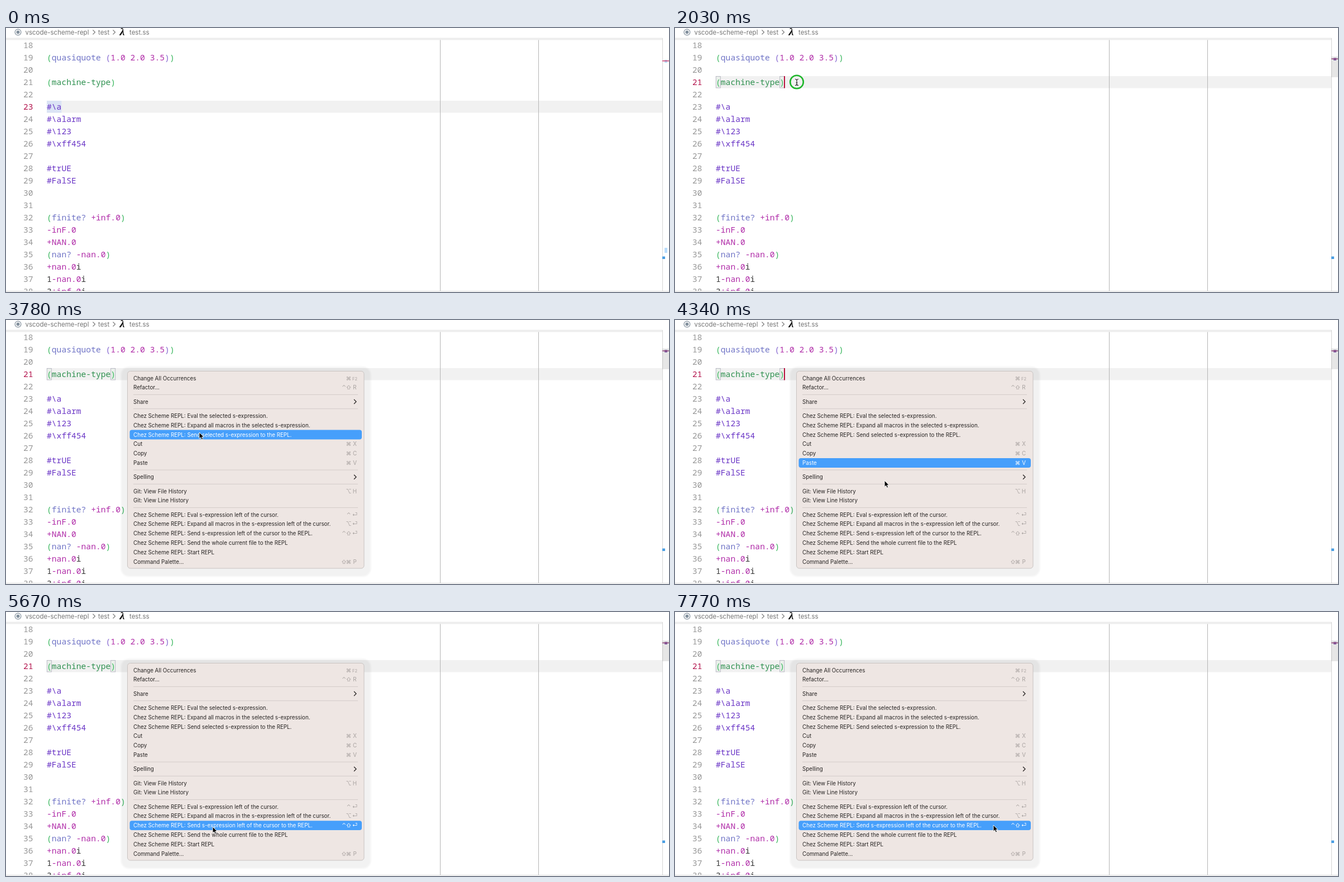
An HTML page that plays this animation: 1187x472 px, repeating every 8000 ms.

```html
<!DOCTYPE html>
<html lang="en">
<head>
<meta charset="utf-8">
<title>Scheme REPL editor</title>
<style>
  html, body { margin: 0; width: 100%; height: 100%; overflow: hidden; background: #fff; }
  svg { display: block; width: 100vw; height: 100vh; }
  text { white-space: pre; }
  .code { font: 14.667px "Noto Sans Mono", "DejaVu Sans Mono", monospace; }
  .num { fill: #979797; text-anchor: end; }
  .num.on { fill: #b3154d; }
  .g { fill: #37b65c; }
  .k { fill: #7074c6; }
  .v { fill: #8667d0; }
  .n { fill: #b02ca8; }
  .m { fill: #2f9150; }
  .c { fill: #6a35c6; }
  .d { fill: #333; }
  .crumb { font: 11.5px Inter, "Open Sans", sans-serif; fill: #767676; }
  .item { font: 9.78px Inter, "DejaVu Sans", sans-serif; fill: #272423; }
  .item .key { fill: #a8a2a0; text-anchor: middle; }
  .item .bar { fill: none; }
  .item.on, .item.on .key { fill: #fff; }
  .item.on .bar { fill: #469ffb; }
  .chevron { fill: none; stroke: #767676; stroke-width: 1.1; }
  .item .chevron { stroke: #272423; stroke-width: 1.3; }
  .halo { filter: blur(1.5px); }
</style>
</head>
<body>
<svg id="stage" viewBox="0 0 1187 472"></svg>
<script>
const STEP = 70, LOOP = 8000;
const CLICK = 980, RIGHT_CLICK = 1960, MENU_OPEN = 2100;
const stage = document.getElementById('stage');

function add(parent, tag, attrs = {}, content) {
  const el = document.createElementNS('http://www.w3.org/2000/svg', tag);
  for (const name in attrs) el.setAttribute(name, attrs[name]);
  if (content !== undefined) el.textContent = content;
  parent.append(el);
  return el;
}
const group = parent => add(parent, 'g');
const rect = (parent, x, y, width, height, fill, more) =>
  add(parent, 'rect', { x, y, width, height, fill, ...more });
const text = (parent, x, y, cls, content, more) =>
  add(parent, 'text', { x, y, class: cls, ...more }, content);
const path = (parent, d, more) => add(parent, 'path', { d, ...more });
const chevron = (parent, x, y) =>
  path(parent, `M${x} ${y - 4}l4 4l-4 4`, { class: 'chevron' });
const show = (el, on) => el.setAttribute('visibility', on ? 'visible' : 'hidden');

// Editor: each token starts with its colour class.
const FIRST_LINE = 18, LEFT = 73, CHAR = 8.8;
const lines = [
  '', 'g(|kquasiquote|v (|n1.0 2.0 3.5|v)|g)', '', 'g(|mmachine-type|g)', '',
  'c#\\a', 'c#\\alarm', 'c#\\123', 'c#\\xff454', '', 'c#trUE', 'c#FalSE', '', '',
  'g(|kfinite? |n+inf.0|g)', 'n-inF.0', 'n+NAN.0', 'g(|knan? |n-nan.0|g)',
  'n+nan.0|di', 'd1|n-nan.0|di', 'd3|n+inf.0|di'
];
const lineTop = n => 20 + 22 * (n - FIRST_LINE);
const column = n => LEFT + CHAR * n;

const band = rect(stage, LEFT, 0, 1102, 21.5, '#f1f1f1');
const selection = rect(stage, LEFT, lineTop(23), 3 * CHAR, 21.5, '#dbe3f5');
const brackets = group(stage);
for (const n of [0, 13])
  rect(brackets, column(n) + .3, 86.5, 8, 20.5, '#ebf0eb', { stroke: '#b4b4c0', 'stroke-width': .9 });

const numbers = {};
lines.forEach((line, i) => {
  const n = FIRST_LINE + i, y = lineTop(n) + 16;
  numbers[n] = text(stage, 48.5, y, 'code num', n);
  const row = text(stage, LEFT, y, 'code');
  for (const token of line.split('|'))
    if (token) add(row, 'tspan', { class: token[0] }, token.slice(1));
});
const caret = rect(stage, 195, 86, 2, 21.5, '#b8123f');

for (const n of [80, 100]) rect(stage, column(n), 18, 1, 453, '#b5b5b5');
rect(stage, 1175, 18, 1, 453, '#d6d6d6');
rect(stage, 0, 470, 1187, 2, '#fff');
rect(stage, 0, 470, 1187, 1, '#d9d9d9');
rect(stage, 0, 17.5, 1175, 4, '#ededed');

// Overview ruler
const rulerBefore = group(stage);
rect(rulerBefore, 1179, 57, 5, 5, '#b5d5f5');
rect(rulerBefore, 1175, 58, 12, 1.5, '#cf4473');
rect(rulerBefore, 1179, 393, 5, 9, '#b9dcfb');
const rulerAfter = group(stage);
rect(rulerAfter, 1179, 53.5, 5, 4.5, '#8b62b0');
rect(rulerAfter, 1175, 54.5, 12, 1.5, '#96407f');
rect(stage, 1175, 408.5, 5, 4.5, '#4a9ee2');
const slider = rect(stage, 1175, 51, 12, 37, 'rgba(100,100,100,.16)');

// Breadcrumbs
add(stage, 'circle', { cx: 21.5, cy: 7.5, r: 5.4, fill: 'none', stroke: '#84919e', 'stroke-width': 1.2 });
add(stage, 'circle', { cx: 21.5, cy: 7.5, r: 3, fill: '#84919e' });
text(stage, 34.5, 12, 'crumb', 'vscode-scheme-repl');
chevron(stage, 155.5, 7.5);
text(stage, 165, 12, 'crumb', 'test');
chevron(stage, 191.5, 7.5);
text(stage, 203, 13, '', 'λ', { style: 'font: italic bold 17px "Noto Serif", serif' });
text(stage, 221, 12, 'crumb', 'test.ss');

// Context menu: label | shortcut glyphs; '-' is a separator, '>' a submenu.
const repl = 'Chez Scheme REPL: ';
const entries = [
  'Change All Occurrences|⌘,F2', 'Refactor...|⌃,⇧,R', '-', 'Share|>', '-',
  repl + 'Eval the selected s-expression.',
  repl + 'Expand all macros in the selected s-expression.',
  repl + 'Send selected s-expression to the REPL.',
  'Cut|⌘,X', 'Copy|⌘,C', 'Paste|⌘,V', '-', 'Spelling|>', '-',
  'Git: View File History|⌥,H', 'Git: View Line History', '-',
  repl + 'Eval s-expression left of the cursor.|⌃,⏎',
  repl + 'Expand all macros in the s-expression left of the cursor.|⌥,⏎',
  repl + 'Send s-expression left of the cursor to the REPL.|⌃,⇧,⏎',
  repl + 'Send the whole current file to the REPL',
  repl + 'Start REPL', 'Command Palette...|⇧,⌘,P'
];
const ROW = 16.83;
const menu = group(stage);
rect(menu, 206, 84, 447, 374.5, 'rgba(0,0,0,.052)', { rx: 14, class: 'halo' });
rect(menu, 217.5, 91.5, 423.5, 352.5, '#eee6e3', { rx: 5, stroke: '#c8c3c1' });

const items = [];
let rowY = 104;
for (const entry of entries) {
  if (entry === '-') {
    rect(menu, 228, rowY - ROW / 2 + 3.7, 402, 1, '#d3ccc9');
    rowY += ROW / 2;
    continue;
  }
  const [label, keys] = entry.split('|');
  const el = add(menu, 'g', { class: 'item' });
  add(el, 'rect', { x: 221.5, y: rowY - ROW / 2, width: 415.5, height: ROW, rx: 4, class: 'bar' });
  text(el, 228, rowY + 3.6, '', label);
  if (keys === '>') chevron(el, 623, rowY);
  else if (keys) keys.split(',').reverse().forEach((key, i) =>
    text(el, [624.5, 613.5, 605][i], rowY + 3.6, 'key', key,
      key === 'F2' ? { 'font-size': 7.5 } : {}));
  items.push({ el, y: rowY });
  rowY += ROW;
}

// Pointer
const ring = add(stage, 'circle', { cx: 218, cy: 96.5, r: 11.8, fill: 'none', stroke: '#1fb62b', 'stroke-width': 2.6 });
const beam = group(stage);
const beamShape = 'M-3 -5.5Q0 -5.5 0 -3.5Q0 -5.5 3 -5.5M0 -4V4M-3 5.5Q0 5.5 0 3.5Q0 5.5 3 5.5M-1.5 1H1.5';
path(beam, beamShape, { fill: 'none', stroke: '#fff', 'stroke-width': 2.6 });
path(beam, beamShape, { fill: 'none', stroke: '#111', 'stroke-width': 1.1 });
const arrow = path(stage, 'M0 0V11.3L2.6 8.9L4.4 13L6.5 12.1L4.7 8.1H8.1Z',
  { fill: '#000', stroke: '#fff', 'stroke-width': .9 });

// time, x, y
const route = [
  [70, 472, 387], [840, 218, 97], [3500, 218, 97], [3710, 345, 200], [3780, 347, 202],
  [4060, 347, 202], [4550, 395, 344], [4900, 383, 380], [5250, 371, 385], [5670, 371, 385],
  [6440, 570, 384], [7140, 570, 384], [7280, 571, 382]
];
const blinks = [980, 1400, 1960, 2520, 3080, 3570, 4130, 4620, 5180, 5670, 6160, 6720, 7210, 7770];

function pointerAt(t) {
  const next = route.findIndex(key => key[0] > t);
  if (next < 0) return route[route.length - 1].slice(1);
  if (next === 0) return route[0].slice(1);
  const [t0, x0, y0] = route[next - 1], [t1, x1, y1] = route[next];
  const p = (t - t0) / (t1 - t0), ease = p * p * (3 - 2 * p);
  return [x0 + (x1 - x0) * ease, y0 + (y1 - y0) * ease];
}

function render(t) {
  const clicked = t >= CLICK, open = t >= MENU_OPEN;
  const [x, y] = pointerAt(t);

  band.setAttribute('y', lineTop(clicked ? 21 : 23));
  numbers[21].classList.toggle('on', clicked);
  numbers[23].classList.toggle('on', !clicked);
  show(selection, !clicked);
  show(rulerBefore, !clicked);
  show(rulerAfter, clicked);
  show(brackets, clicked);
  show(slider, t >= RIGHT_CLICK);
  show(caret, blinks.filter(b => b <= t).length % 2);

  show(ring, (t >= CLICK - STEP && !clicked) || (t >= RIGHT_CLICK && !open));
  show(beam, t >= STEP && !open);
  show(arrow, open);
  beam.setAttribute('transform', `translate(${x} ${y})`);
  arrow.setAttribute('transform', `translate(${x - 1} ${y - 1})`);

  // The highlight trails the pointer by one step.
  show(menu, open);
  const hoverY = pointerAt(t - STEP)[1] - 1;
  for (const { el, y: mid } of items)
    el.classList.toggle('on', t >= MENU_OPEN + STEP && Math.abs(hoverY - mid) < ROW / 2);
}

const start = performance.now();
function tick() {
  const t = (performance.now() - start) % LOOP;
  render(Math.floor(t / STEP) * STEP);
  requestAnimationFrame(tick);
}
tick();
</script>
</body>
</html>
```
